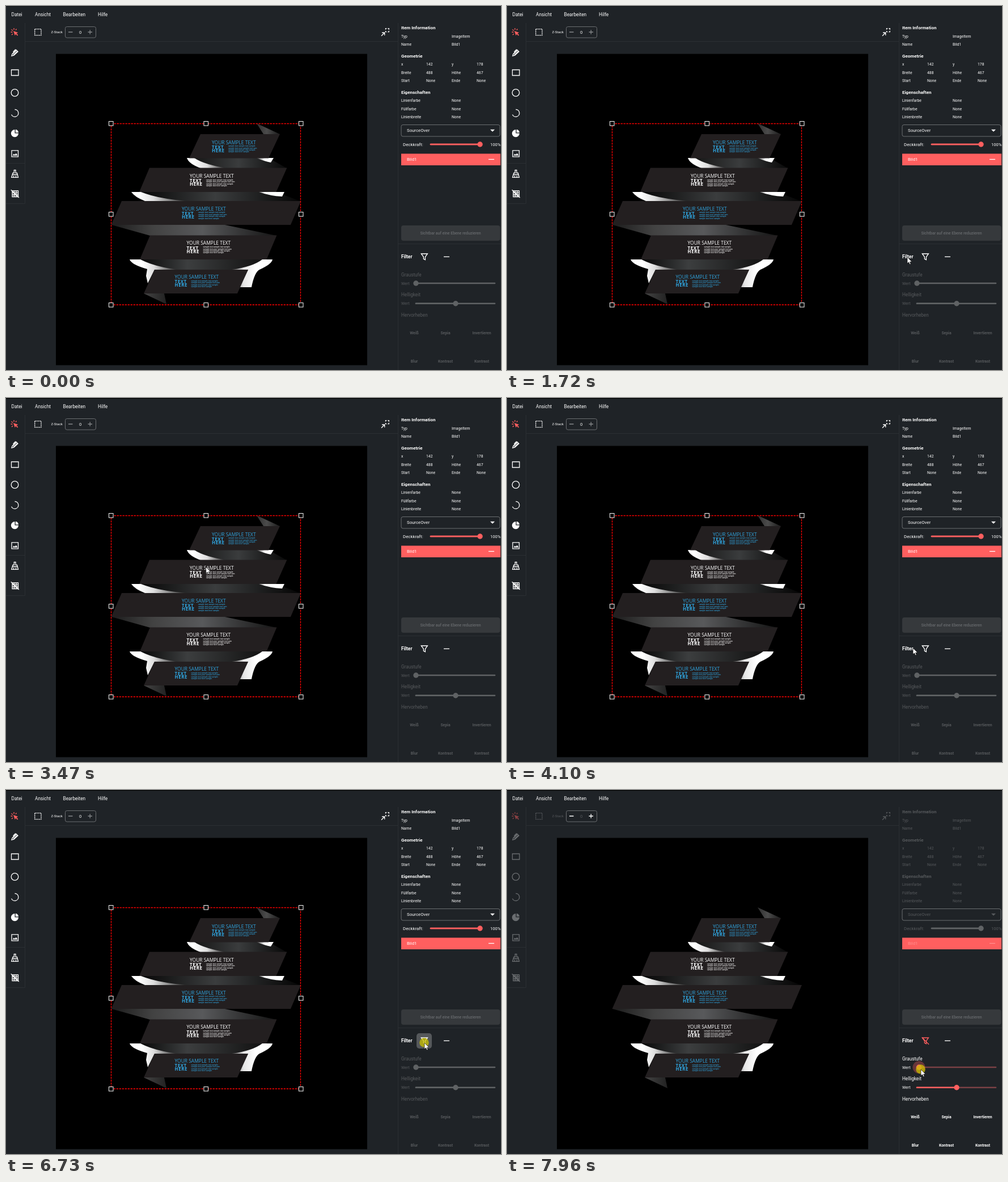
Recreate the animation shown at these times as an HTML page. Size 873x642 px, loop 8 s.

```html
<!DOCTYPE html>
<html lang="de">
<head>
<meta charset="utf-8">
<title>Bildfilter</title>
<style>
html, body { margin: 0; width: 100%; height: 100%; overflow: hidden; background: #1f2327; }
svg { display: block; width: 873px; height: 642px; }
text { fill: currentColor; font-family: Roboto, "Liberation Sans", sans-serif; white-space: pre; }
.art text { font-family: "Open Sans", "Noto Sans", sans-serif; }
.line { fill: none; stroke: currentColor; stroke-width: 1.3; }
.solid { fill: currentColor; }
.rule { stroke: #2b2f33; fill: none; }
.frame { fill: none; stroke: #6b6e71; }
</style>
</head>
<body>
<svg id="stage" viewBox="0 0 873 642" xmlns="http://www.w3.org/2000/svg"></svg>
<script>
const LOOP = 8000, STEP = 70;
const WHITE = '#fff', DIM = '#56595c', RED = '#ff5f5f', DARK_RED = '#7a4145';
const FILTER_ON = 6870, PRESS = 7890;

const text = (x, y, s, size = 6.8, weight = 400, anchor = 'start') =>
  `<text x="${x}" y="${y}" font-size="${size}" font-weight="${weight}" text-anchor="${anchor}">${s}</text>`;
const head = (y, s) => text(697, y, s, 8, 700);
const line = (d, extra = '') => `<path class="line" d="${d}" ${extra}/>`;
const solid = (d) => `<path class="solid" d="${d}"/>`;
const poly = (points, fill) => `<polygon points="${points}" fill="${fill}"/>`;
const rule = (d) => `<path class="rule" d="${d}"/>`;

function gradient(id, x1, x2, stops) {
  const parts = stops.map(([at, color]) => `<stop offset="${at}" stop-color="${color}"/>`);
  return `<linearGradient id="${id}" gradientUnits="userSpaceOnUse" x1="${x1}" x2="${x2}" y1="0" y2="0">${parts.join('')}</linearGradient>`;
}

function caption(x, y, color) {
  const small = ['sample text sample text sample', 'sample text your sample text sam', 'sample text sample text sample', 'sample text here sample'];
  return `<g color="${color}">` + text(x, y, 'YOUR SAMPLE TEXT', 8.46) +
    `<g letter-spacing=".55">${text(x, y + 8.2, 'TEXT', 8, 700)}${text(x, y + 14.4, 'HERE', 8, 700)}</g>` +
    small.map((s, i) => text(x + 29, y + 4.7 + i * 3.4, s, 3.1, 600)).join('') + '</g>';
}

function artwork() {
  const ink = '#231f20', blue = '#2fa4de';
  const bands = [
    '343,226 483,226 463,268.5 323,268.5',
    '253,285.5 495.5,285.5 476.5,328 235,328',
    '204,344 520,344 502,386 185.5,386',
    '254,404.5 477.5,404.5 459.5,447 236,447',
    '262,465 427,465 408,507 243,507'
  ];
  return '<defs>' +
    gradient('tail', 445, 482, [[0, '#333'], [.4, '#4c4c4c'], [1, '#1c1c1c']]) +
    gradient('foot', 243, 283, [[0, '#444'], [1, '#222']]) +
    gradient('foldA', 340, 495, [[0, '#1a1a1a'], [.45, '#3a3c3d'], [1, '#080808']]) +
    gradient('foldB', 250, 515, [[0, '#0c0c0c'], [.45, '#3b3d3e'], [1, '#060606']]) +
    gradient('foldC', 186, 477, [[0, '#1c1c1c'], [.25, '#424242'], [.55, '#58595b'], [1, '#141414']]) +
    gradient('foldD', 240, 440, [[0, '#0a0a0a'], [.4, '#3c3e3f'], [1, '#161616']]) +
    gradient('glowA', 330, 385, [[0, '#fff'], [.45, '#ddd'], [1, '#333']]) +
    gradient('glowB', 235, 320, [[0, '#fff'], [.3, '#ddd'], [1, '#222']]) +
    gradient('glowC', 440, 472, [[0, '#444'], [.5, '#fff']]) +
    gradient('glowD', 398, 440, [[0, '#555'], [.5, '#e6e6e6'], [1, '#fff']]) +
    gradient('glowE', 240, 300, [[0, '#fff'], [.35, '#ddd'], [1, '#333']]) + '</defs>' +
    poly('442,207 483,226 454,226', 'url(#tail)') +
    poly('243,507 279,507 283,526', 'url(#foot)') +
    poly('323,268 463,268 495,286 350,286', 'url(#foldA)') +
    '<path d="M319 268Q322 278 343 286H390Q350 280 332 268z" fill="url(#glowA)"/>' +
    '<path d="M442 268H472L467 276Q456 274 442 268z" fill="url(#glowC)"/>' +
    poly('235,328 476,328 519,344 252,344', 'url(#foldB)') +
    '<path d="M221 328Q227 337 245 344H320Q268 340 238 328z" fill="url(#glowB)"/>' +
    '<path d="M446 328H491L487 336Q466 335 446 328z" fill="url(#glowC)"/>' +
    poly('186,386 386,386 477,405 254,405', 'url(#foldC)') +
    poly('236,447 456,447 427,466 262,466', 'url(#foldD)') +
    '<path d="M218 447H237Q262 460 302 465H262L250 489L247 476L249 464Q221 456 218 447z" fill="url(#glowE)"/>' +
    '<path d="M398 465Q435 460 452 447H470Q469 455 447 465Q438 470 433 496H412L427 465z" fill="url(#glowD)"/>' +
    bands.map(b => poly(b, ink)).join('') +
    caption(363, 243.5, blue) + caption(324, 303, WHITE) + caption(310, 360.6, blue) +
    caption(318.5, 421.4, WHITE) + caption(297.5, 481, blue);
}

function selection() {
  let s = '<rect x="185.5" y="207.5" width="334" height="319.5" fill="none" stroke="#f00" stroke-width="1.3" stroke-dasharray="3.4 1.6"/>';
  for (const x of [185, 352.5, 520]) for (const y of [207, 367, 527])
    if (x !== 352.5 || y !== 367)
      s += `<rect x="${x - 3.5}" y="${y - 3.5}" width="7.5" height="7.5" fill="#000" stroke="#fff"/>`;
  return s;
}

function tools() {
  return line('M9.5 41.5L12 43.5M14 39V42M8.5 46H11.5M10 51L12 49M18.5 40.5L17 42.5') +
    solid('M13 44L21.5 47L18.5 48.3L21.3 51.2L20 52.5L17.2 49.6L15.8 52.2z') +
    '<g id="tools">' +
    line('M10 88L11 84.5L18 77.5L21 80.5L14 87z M12 84.5L18.5 78M17 76.5L12.5 81M13 86.5L20 79.5') +
    line('M9.5 112.5H22V122.5H9.5z') +
    '<circle class="line" cx="15.5" cy="153" r="6.3"/>' +
    line('M15.5 182.5A6.4 6.4 0 1 1 9.6 191.5') +
    solid('M15.5 224.5V218A6.6 6.6 0 1 0 22 224.5z M16.8 223.2V217.8A6 6 0 0 1 22 223.2z') +
    line('M10 254.8H21.5V265.8H10z') + solid('M11.5 263.8L14 260.5L15.7 262.4L17.7 259.6L20.5 263.8z') +
    line('M14.3 294.5V289.5H17V294.5H19.5L21.5 302.3H9.8L12 294.5zM11.5 297.5H20M13.5 302V299.5M17.5 302V299.5') +
    line('M11 326H21.5V336.5H11zM14.5 326V336.5M18 326V336.5M11 329.5H21.5M11 333H21.5', 'stroke-width="1"') +
    line('M8.8 324.3L22.8 338') + '</g>';
}

function toolbar() {
  return line('M50.7 40.7H62V51.7H50.7z', 'stroke-dasharray="2 1"') + text(79.5, 48.4, 'Z-Stack', 6) +
    text(131, 48.6, '0', 7.5, 400, 'middle') +
    line('M662 52.7L667 47.7M663 47H667.7V51.7') +
    line('M669.5 41.5V39.7H671.3M673.3 39.7H675.3V41.7M675.3 43.7V45.7H673.3M671.2 45.7H669.5V44', 'stroke-width="1.4"');
}

function info() {
  const rows = [
    [55.6, 'Typ', 'ImageItem'], [70.2, 'Name', 'Bild1'],
    [169.2, 'Linienfarbe', 'None'], [183.7, 'Füllfarbe', 'None'], [198.2, 'Linienbreite', 'None']
  ];
  const grid = [
    [105.1, 'x', '142', 'y', '178'], [119.7, 'Breite', '488', 'Höhe', '467'], [134.2, 'Start', 'None', 'Ende', 'None']
  ];
  return head(41.3, 'Item Information') + head(90.7, 'Geometrie') + head(154.7, 'Eigenschaften') +
    rows.map(([y, a, b]) => text(697, y, a) + text(786, y, b)).join('') +
    grid.map(([y, ...cells]) => cells.map((c, i) => text([697, 741, 786, 830][i], y, c)).join('')).join('') +
    text(707, 221.9, 'SourceOver', 7.8) + solid('M854 217.7H862L858 221.7z') +
    text(700, 246.8, 'Deckkraft:', 7.9) + text(854, 246.8, '100%', 7.5);
}

function filterTexts() {
  const names = [['Weiß', 'Sepia', 'Invertieren'], ['Blur', 'Kontrast', 'Kontrast']];
  return text(697, 476.8, 'Graustufe', 8.2) + text(697, 491.7, 'Wert', 7) +
    text(697, 512.4, 'Helligkeit', 8.2) + text(697, 527.3, 'Wert', 7) + text(697, 548, 'Hervorheben', 8.2) +
    names.map((row, r) => row.map((n, i) =>
      text([720, 775, 839][i], 579.2 + r * 50.2, n, 6.8, 700, 'middle')).join('')).join('');
}

const slider = (id, y, x1, x2) =>
  `<g stroke-width="2.6" stroke-linecap="round"><path id="${id}Track" d="M${x1} ${y}H${x2}"/><path id="${id}Fill"/></g>
   <circle id="${id}Knob" cy="${y}" r="4.7"/>`;

document.getElementById('stage').innerHTML = `
<rect width="873" height="642" fill="#1f2327"/>
<rect id="edge" width="873" height="1.2"/>
${rule('M33.5 30V348.5H0M0 277.5H33M33 62.5H691.5M691.5 30V642M692 419.5H873')}
<rect x="88" y="84.5" width="549" height="549" fill="#000"/>
<g class="art">${artwork()}</g>
<g id="selection">${selection()}</g>
<g color="#fff">${text(9.5, 18, 'Datei', 8.3)}${text(51, 18, 'Ansicht', 8.3)}${text(100.5, 18, 'Bearbeiten', 8.3)}${text(162, 18, 'Hilfe', 8.3)}</g>
<g id="left">${tools()}</g>
<rect class="frame" x="104.5" y="36.5" width="54" height="19.5" rx="3"/>
<g id="spin">${line('M110 46H117.5M144.5 46H152M148.2 42.2V49.8')}</g>
<rect class="frame" x="697" y="209.5" width="174" height="20.5" rx="3"/>
<g id="main">${toolbar()}${info()}</g>
${slider('alpha', 244, 749, 836)}
<rect x="697" y="260.5" width="175" height="20.5" fill="#ff5f5f"/>
<g id="layer">${text(707, 272.9, 'Bild1', 7.8)}${line('M851 270.5H861')}</g>
<rect x="697" y="387" width="174.5" height="27" rx="4" fill="#36393c"/>
<g color="#686b6e">${text(784, 402.7, 'Sichtbar auf eine Ebene reduzieren', 6.9, 500, 'middle')}</g>
<g color="#fff">${text(697, 445.4, 'Filter', 8.4, 700)}${line('M772 442.3H782', 'stroke-width="1.5"')}</g>
<rect id="hover" x="724" y="429" width="27" height="27" rx="5" fill="#55585b"/>
<g id="funnel">${line('M732.3 437H743.4L739.4 442.5V447.6L736.4 446V442.5z')}<g id="slash">${line('M732 436.5L744 448.7')}</g></g>
<g id="filter">${filterTexts()}</g>
${slider('gray', 489, 723, 862)}
${slider('light', 524.7, 723, 862)}
<circle id="halo" cy="489" r="11" fill="#ff5f5f"/>
<circle id="click" r="8.3" fill="#c9c000" opacity=".75"/>
<path id="cursor" d="M0 0V11L2.6 8.8L4.3 12.7L6.1 12L4.5 8.2L8 8z" fill="#fff" stroke="#000" stroke-width=".6"/>`;

// Pointer moves: start, number of steps, way points
const moves = [
  [530, 12, [[807, 634], [780, 570], [700, 490], [622, 434], [650, 432], [689, 443]]],
  [1370, 6, [[692, 443], [706, 443]]],
  [2720, 4, [[709, 457], [710, 462]]],
  [3260, 12, [[700, 455], [480, 330], [130, 243], [400, 300], [640, 420], [715, 441]]],
  [4100, 11, [[716, 441], [710, 439], [735, 510], [785, 645]]],
  [5640, 7, [[808, 611], [765, 550], [718, 488], [703, 474]]],
  [6260, 11, [[705, 470], [722, 455], [738, 446], [738, 446], [738, 446]]],
  [7080, 9, [[737, 450], [734, 470], [730, 488], [730, 493]]]
];

function pointer(t) {
  const move = moves.filter(m => m[0] <= t).pop();
  if (!move) return [-50, -50];
  const [start, steps, pts] = move;
  const p = Math.min(1, Math.floor((t - start) / STEP) / (steps - 1)) * (pts.length - 1);
  const i = Math.min(Math.floor(p), pts.length - 2), f = p - i;
  return [0, 1].map(k => pts[i][k] + (pts[i + 1][k] - pts[i][k]) * f);
}

const el = {};
document.querySelectorAll('#stage [id]').forEach(e => el[e.id] = e);
const set = (id, attrs) => { for (const k in attrs) el[id].setAttribute(k, attrs[k]); };
const show = (id, on) => set(id, { visibility: on ? 'visible' : 'hidden' });
const ramp = (t, a, b) => Math.max(0, Math.min(1, (t - a) / (b - a)));

function setSlider(id, start, x, y, fill, track) {
  set(id + 'Track', { stroke: track });
  set(id + 'Fill', { d: `M${start} ${y}H${x}`, stroke: fill });
  set(id + 'Knob', { cx: x, fill });
}

function draw(t) {
  const on = t >= FILTER_ON, pressed = t >= PRESS;
  const main = on ? DIM : WHITE;
  const [x, y] = pointer(t);
  set('edge', { fill: t < 2120 ? '#14171a' : '#000' });
  show('selection', !on);
  set('left', { color: on ? '#8a4043' : RED });
  set('tools', { color: on ? '#6a6d70' : WHITE });
  set('main', { color: main });
  set('spin', { color: on ? WHITE : '#85888a' });
  set('layer', { color: on ? '#ff8f8f' : WHITE });
  set('funnel', { color: on ? RED : WHITE });
  show('slash', on);
  set('filter', { color: on ? WHITE : DIM });

  const grayX = t >= 7960 ? 726.5 : 723;
  const live = on ? RED : '#5f6264', rest = on ? DARK_RED : '#5f6264';
  setSlider('alpha', 749, 836, 244, on ? '#606365' : RED, on ? '#606365' : RED);
  setSlider('gray', 723, grayX, 489, live, rest);
  setSlider('light', 723, 793, 524.7, live, rest);

  set('hover', { opacity: ramp(t, 6470, 6600) * (1 - ramp(t, 7150, 7290)) });
  set('halo', { cx: grayX, opacity: ramp(t, 7430, 7570) * (pressed ? .32 : .22) });
  set('click', { cx: x - .5, cy: y - .5 });
  show('click', (t >= 6680 && t < FILTER_ON) || pressed);
  set('cursor', { transform: `translate(${x.toFixed(2)} ${y.toFixed(2)})` });
}

const begin = performance.now();
function tick() {
  draw((performance.now() - begin) % LOOP);
  requestAnimationFrame(tick);
}
draw(0);
requestAnimationFrame(tick);
</script>
</body>
</html>
```
